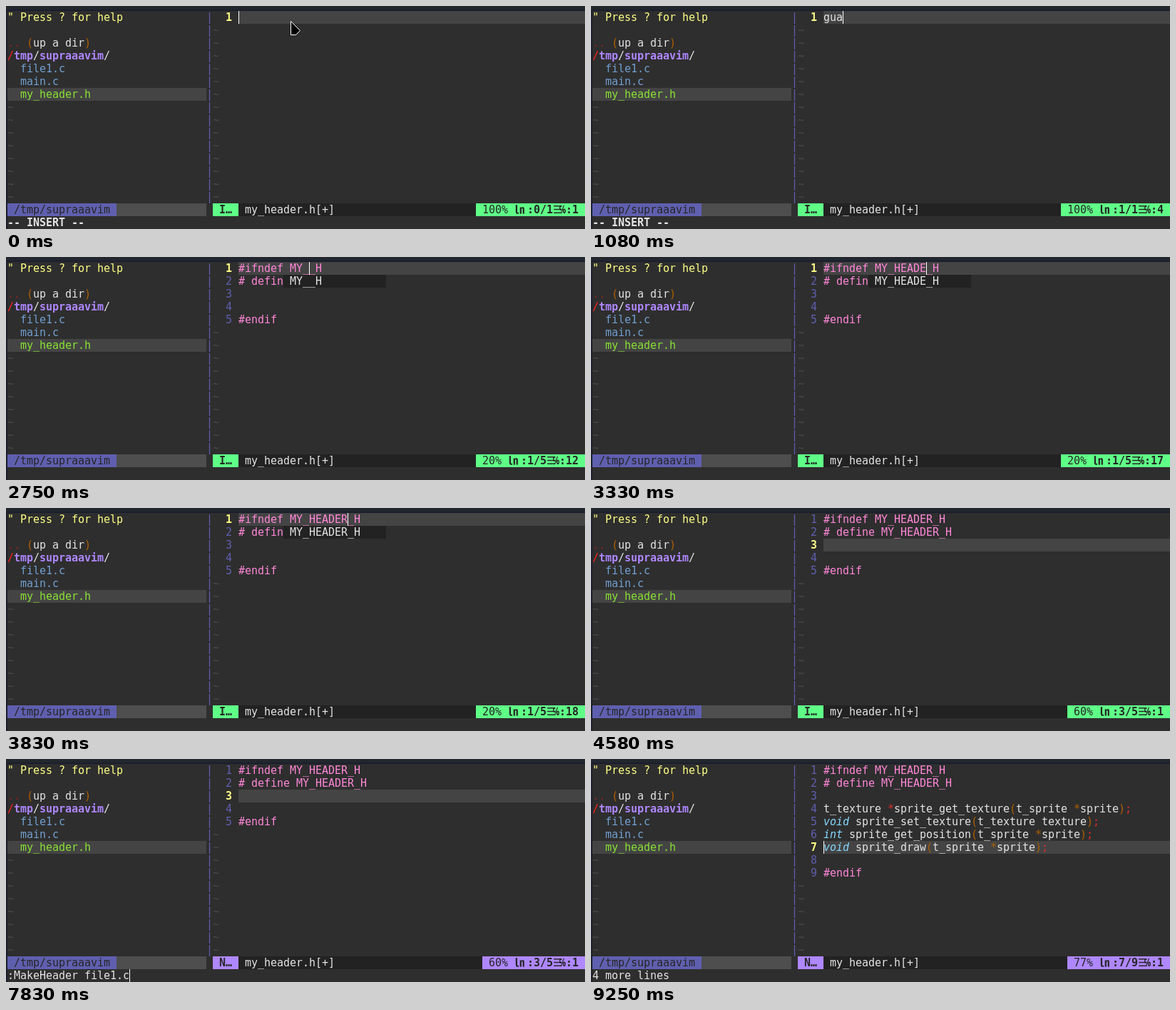
An HTML page with a canvas that plays this animation: 812 px wide and 313 px high, repeating every 9.67 s.

```html
<!DOCTYPE html>
<html lang="en">
<head>
<meta charset="utf-8">
<title>Header guard in a terminal editor</title>
<style>
html, body { margin: 0; width: 100%; height: 100%; overflow: hidden; background: #2e2e2e; }
canvas { display: block; }
</style>
</head>
<body>
<canvas id="stage" width="812" height="313"></canvas>
<script>
const ctx = document.getElementById('stage').getContext('2d');
const LOOP = 9670, CELL = 9, LINE = 18, LEFT = 2, TOP = 7;
const CODE = 36, STATUS = 15, COMMAND = 16;
const FAMILY = '"DejaVu Sans Mono", "DejaVu Sans", "Noto Sans CJK JP", "Noto Sans CJK", monospace';

const C = {
  bg: '#2e2e2e', bar: '#222222', line: '#444444', grey: '#4e4e4e', select: '#626262',
  text: '#e4e4e4', dark: '#262626', tilde: '#4a4a4a', indigo: '#5f5faf', yellow: '#ffff87',
  pink: '#ff87d7', purple: '#af87ff', cyan: '#87d7ff', blue: '#729fcf', green: '#8ae234',
  orange: '#af5f00', red: '#d72f2f', maroon: '#8a2424'
};
const MODES = { I: '#5fff87', S: '#ffff87', N: '#af87ff' };

const guard = name => ['#ifndef ' + name + '_H', '# define ' + name + '_H', '', '', '#endif'];
const finished = [
  '#ifndef MY_HEADER_H', '# define MY_HEADER_H', '',
  't_texture *sprite_get_texture(t_sprite *sprite);',
  'void sprite_set_texture(t_texture texture);',
  'int sprite_get_position(t_sprite *sprite);',
  'void sprite_draw(t_sprite *sprite);',
  '', '#endif'
];

// Each step overrides part of the state left by the one before.
const steps = [[0, {
  lines: [''], row: 0, col: 1, mode: 'I', cmd: '-- INSERT --', caret: true,
  mouse: true, popup: '', selected: 0, typing: false
}]];
const step = (time, change) => steps.push([time, change]);

step(580, { caret: false });
[750, 920, 1000, 1170, 1250].forEach((t, i) =>
  step(t, { lines: ['guard'.slice(0, i + 1)], col: i + 2, caret: true, mouse: false }));
step(1920, { lines: guard('LIBFT'), col: 13, mode: 'S', cmd: '-- SELECT --', selected: 4 });

const typeName = (time, name, popup, cmd) => step(time, {
  lines: guard(name), col: 9 + name.length, mode: 'I', selected: 0,
  popup: popup ? name + '_H' : '', cmd
});
typeName(2250, 'M', false, '-- INSERT --');
typeName(2420, 'MY', false, '-- INSERT --');
typeName(2750, 'MY_', true, '');
typeName(3170, 'MY_H', true, '');
typeName(3250, 'MY_HEA', true, '');
typeName(3330, 'MY_HEADE', true, '');
typeName(3830, 'MY_HEADER', true, '');
step(3920, { row: 3, col: 1, popup: '', cmd: '-- INSERT --' });
step(4250, { cmd: '' });
step(4580, { row: 2, caret: false });

const typeCommand = (time, cmd) => step(time, { mode: 'N', cmd, typing: true, caret: true });
typeCommand(4830, ':M');
step(5420, { caret: false });
typeCommand(5500, ':Ma');
typeCommand(5580, ':Mak');
typeCommand(5750, ':Make');
typeCommand(5920, ':MakeHeader');
[6420, 6580, 6750, 6920, 7080, 7420, 7580, 7830].forEach((t, i) =>
  typeCommand(t, ':MakeHeader' + ' file1.c'.slice(0, i + 1)));
step(8080, { lines: finished, row: 6, cmd: '4 more lines', typing: false, caret: true });
step(8670, { caret: false });
step(9250, { caret: true });

const stateAt = time => Object.assign({}, ...steps.filter(s => s[0] <= time).map(s => s[1]));

const xOf = col => LEFT + col * CELL;
const yOf = row => TOP + row * LINE;

function box(x, y, w, h, color) {
  ctx.fillStyle = color;
  ctx.fillRect(x, y, w, h);
}

function cells(col, row, count, color) {
  box(xOf(col), yOf(row), count * CELL, LINE, color);
}

// Writes on the character grid and returns the next free column.
function write(col, row, str, color, style = '') {
  ctx.font = style + ' 15px ' + FAMILY;
  ctx.fillStyle = color;
  for (const ch of str) {
    if (ch !== ' ') ctx.fillText(ch, xOf(col), yOf(row) + 14);
    col += ch === '㏑' ? 2 : 1;
  }
  return col;
}

function writeParts(col, row, parts) {
  for (const part of parts) col = write(col, row, ...part);
}

function drawCode(line, row) {
  if (line.startsWith('#')) return write(CODE, row, line, C.pink);
  let col = CODE, depth = 0;
  for (const token of line.match(/\w+|\W/g) || []) {
    let color = C.text, style = '';
    if (token === 'void' || token === 'int') { color = C.cyan; style = 'italic'; }
    if (token === '(') depth++;
    if (token === '(' || token === ')') color = C.orange;
    if (token === '*') color = depth ? C.orange : C.red;
    if (token === ';') color = C.red;
    if (token === ')') depth--;
    col = write(col, row, token, color, style);
  }
}

function drawTree() {
  cells(0, 6, 31, C.line);
  write(0, 0, '" Press ? for help', C.yellow);
  writeParts(0, 2, [['..', C.maroon], [' '], ['(', C.orange], ['up a dir', C.text], [')', C.orange]]);
  writeParts(0, 3, [['/', '#ff2020'], ['tmp', C.purple, 'bold'], ['/', C.text],
    ['supraaavim', C.purple, 'bold'], ['/', C.text]]);
  write(2, 4, 'file1.c', C.blue);
  write(2, 5, 'main.c', C.blue);
  write(2, 6, 'my_header.h', C.green);
  for (let row = 7; row < STATUS; row++) write(0, row, '~', C.tilde);
  for (let row = 0; row < STATUS; row++) write(31, row, '|', C.indigo);
}

function drawBuffer(s) {
  if (s.mode !== 'S') box(xOf(CODE), yOf(s.row), 812 - xOf(CODE), LINE, C.line);
  if (s.selected) cells(CODE + s.col - 1 - s.selected, s.row, s.selected, C.select);
  s.lines.forEach((line, row) => {
    const current = row === s.row;
    write(34, row, String(row + 1), current ? C.yellow : C.indigo, current ? 'bold' : '');
    drawCode(line, row);
  });
  for (let row = s.lines.length; row < STATUS; row++) write(32, row, '~', C.tilde);
  if (s.popup) {
    cells(43, 1, 16, C.bar);
    write(44, 1, s.popup, C.text);
  }
}

function drawStatus(s) {
  const color = MODES[s.mode];
  cells(0, STATUS, 31, C.grey);
  cells(0, STATUS, 17, C.indigo);
  write(1, STATUS, '/tmp/supraaavim', C.dark);
  box(xOf(32), yOf(STATUS), 812 - xOf(32), LINE, C.bar);
  cells(32, STATUS, 4, color);
  write(33, STATUS, s.mode + '…', C.dark, 'bold');
  write(37, STATUS, 'my_header.h[+]', C.text);

  const total = s.lines.length;
  const percent = Math.floor((s.row + 1) / total * 100) + '%';
  const shown = s.lines.join('') ? s.row + 1 : 0;
  const place = `㏑:${shown}/${total}☰℅:${s.col}`;
  const start = 90 - (percent.length + place.length + 4);
  box(xOf(start), yOf(STATUS), 812 - xOf(start), LINE, color);
  const next = write(start + 1, STATUS, percent, C.dark);
  write(next + 1, STATUS, place, C.dark, 'bold');
}

function drawCaret(s) {
  if (!s.caret) return;
  const col = s.typing ? s.cmd.length : CODE + s.col - 1;
  box(xOf(col), yOf(s.typing ? COMMAND : s.row), 1, LINE, '#ffffff');
}

function drawMouse() {
  ctx.beginPath();
  [[399.5, 21.5], [412.5, 34.5], [406.5, 40.5], [399.5, 40.5]].forEach(p => ctx.lineTo(...p));
  ctx.closePath();
  ctx.fillStyle = '#000000';
  ctx.fill();
  ctx.strokeStyle = '#ffffff';
  ctx.lineWidth = 1;
  ctx.stroke();
}

function draw(time) {
  const s = stateAt(time);
  box(0, 0, 812, 313, C.bg);
  box(0, 0, 812, 6, '#22272e');
  box(0, 5, 812, 2, '#1b1e2c');
  box(0, 6, 2, 307, '#1b1e2c');
  drawTree();
  drawBuffer(s);
  drawStatus(s);
  write(0, COMMAND, s.cmd, C.text, s.cmd.startsWith('--') ? 'bold' : '');
  drawCaret(s);
  if (s.mouse) drawMouse();
}

const began = performance.now();
function tick() {
  draw((performance.now() - began) % LOOP);
  requestAnimationFrame(tick);
}
tick();
</script>
</body>
</html>
```
